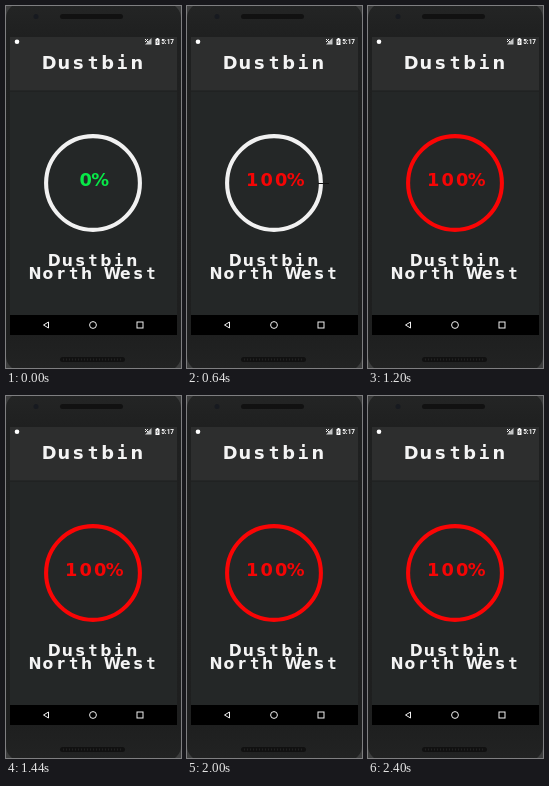
Recreate the animation shown at these times as an HTML page. Size 175x362 px, loop 2.48 s.

```html
<!DOCTYPE html>
<html lang="en">
<head>
<meta charset="utf-8">
<title>Dustbin level</title>
<style>
html, body { margin: 0; width: 100%; height: 100%; overflow: hidden; background: #3c3d3d; }
svg { display: block; width: 100%; height: 100%; }
.label { font: bold 15.6px "DejaVu Sans", sans-serif; text-anchor: middle; fill: #f4f4f4; }
.big { font-size: 17.8px; }
.slab { font-family: "DejaVu Sans Mono", monospace; }
.clock { font: bold 6.4px Roboto, sans-serif; fill: #fff; }
.line { fill: none; stroke: #f0f0f0; stroke-width: 1; }
.ring { fill: none; stroke-width: 4.1; }
</style>
</head>
<body>
<svg viewBox="0 0 175 362" preserveAspectRatio="none">
  <defs>
    <linearGradient id="shell" x2="0" y2="1">
      <stop offset="0" stop-color="#242525"/>
      <stop offset=".09" stop-color="#1f2020"/>
      <stop offset=".9" stop-color="#1e1f1f"/>
      <stop offset="1" stop-color="#222323"/>
    </linearGradient>
  </defs>

  <rect width="175" height="362" fill="#3c3d3d"/>
  <rect x="0" y="-3" width="175" height="368" rx="15" fill="url(#shell)"/>
  <rect x="54" y="8" width="63" height="5" rx="2.5" fill="#111"/>
  <circle cx="30" cy="10.5" r="2.5" fill="#171a20"/>
  <rect x="54" y="351" width="65" height="5" rx="2.5" fill="#111"/>
  <path d="M57 353.5H117" stroke="#222" stroke-width="2" stroke-dasharray="1 2"/>

  <rect x="4" y="31" width="167" height="298" fill="#242727"/>
  <rect x="4" y="31" width="167" height="54" fill="#2d2e2e"/>
  <rect x="4" y="84.5" width="167" height="1" fill="#1d1f1f"/>
  <rect x="4" y="309" width="167" height="20" fill="#000"/>

  <circle cx="11" cy="35.7" r="2.3" fill="#fff"/>
  <path d="M139 38.5H145.5V32Z" fill="#c4c5c5"/>
  <path d="M139 33l3 3m0-3l-3 3" class="line"/>
  <path d="M149.5 33h1v-1h2v1h1v6h-4z" fill="#fff"/>
  <path d="M151.8 33.8l-1.2 2.1h1.6l-1.2 2.2" fill="none" stroke="#333" stroke-width=".6"/>
  <text x="155.2" y="38.3" class="clock">5:17</text>

  <text id="title" y="63" class="label big"></text>
  <text id="name" y="260" class="label"></text>
  <text id="place" y="273" class="label"></text>

  <circle id="track" cx="87" cy="177" r="46.9" class="ring" stroke="#f1f1f1"/>
  <path id="arc" class="ring" stroke="#fa0505"/>
  <path id="tick" d="M131 177.5H142" stroke="#111" stroke-width="1"/>
  <text id="level" y="179.5" class="label big"></text>

  <path d="M42.5 316L37.5 319L42.5 322Z" class="line"/>
  <circle cx="87" cy="319" r="3.4" class="line"/>
  <rect x="131" y="316" width="6" height="6" class="line"/>
</svg>
<script>
const LOOP = 2480, STEP = 80, FILL_AT = 640, SPEED = 340 / 320;
const cx = 87, cy = 177, r = 46.9;
const $ = id => document.getElementById(id);
const arc = $("arc"), track = $("track"), tick = $("tick"), level = $("level");

// Each character is centred in a cell of equal width.
function setCells(el, text, pitch) {
  const left = cx - pitch * (text.length - 1) / 2;
  el.replaceChildren(...[...text].map((char, i) => {
    const span = document.createElementNS("http://www.w3.org/2000/svg", "tspan");
    span.textContent = char;
    span.setAttribute("x", left + i * pitch);
    if ("it".includes(char)) span.setAttribute("class", "slab");
    return span;
  }));
}

function point(deg) {
  const a = deg * Math.PI / 180;
  return `${cx + r * Math.cos(a)} ${cy + r * Math.sin(a)}`;
}

function arcPath(deg) {
  if (deg <= 0) return "";
  return `M${point(0)}A${r} ${r} 0 0 1 ${point(deg / 2)}A${r} ${r} 0 0 1 ${point(deg)}`;
}

const show = (el, on) => el.setAttribute("visibility", on ? "visible" : "hidden");

function draw(ms) {
  const t = Math.floor((ms % LOOP) / STEP) * STEP;
  const full = t >= FILL_AT;
  const sweep = Math.min(360, Math.max(0, (t - FILL_AT) * SPEED));
  arc.setAttribute("d", arcPath(sweep));
  show(track, sweep < 360);
  show(tick, t === FILL_AT);
  setCells(level, full ? "100%" : "0%", 14.5);
  level.style.fill = full ? "#f50505" : "#08e848";
}

setCells($("title"), "Dustbin", 14.6);
setCells($("name"), "Dustbin", 12.9);
setCells($("place"), "North West", 12.9);

const start = performance.now();
function run() {
  draw(performance.now() - start);
  requestAnimationFrame(run);
}
run();
</script>
</body>
</html>
```
